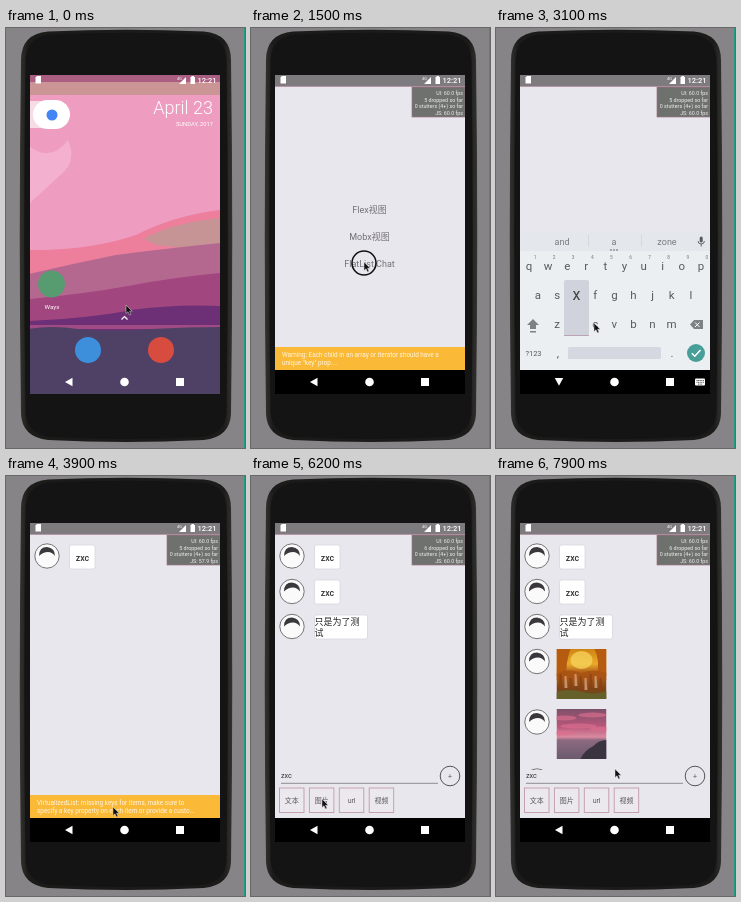
These frames come from a looping animation (239x420 px, 8000 ms). An HTML page:

```html
<!DOCTYPE html>
<html lang="en">
<head>
<meta charset="utf-8">
<title>Phone chat demo</title>
<style>
html, body { margin: 0; width: 100%; height: 100%; overflow: hidden; background: #868486; }
svg { display: block; width: 100%; height: 100%; }
text { font-family: Roboto, "Noto Sans CJK SC", "Noto Sans CJK", sans-serif; }
.mid { text-anchor: middle; }
.end { text-anchor: end; }
.item { font-size: 9px; fill: #737078; }
.key { font-size: 11.5px; fill: #565b60; text-anchor: middle; }
.warn { font-size: 6.4px; fill: #fff5df; }
.perf { font-size: 5.3px; fill: #eee; text-anchor: end; }
</style>
</head>
<body>
<svg id="stage" viewBox="0 0 239 420">
  <defs>
    <linearGradient id="edge">
      <stop offset="0" stop-color="#33322f"/><stop offset=".04" stop-color="#1b1b1a"/>
      <stop offset=".96" stop-color="#1b1b1a"/><stop offset="1" stop-color="#33322f"/>
    </linearGradient>
    <linearGradient id="autumn" x2="0" y2="1">
      <stop offset="0" stop-color="#cf8313"/><stop offset=".3" stop-color="#e9ab2a"/>
      <stop offset=".45" stop-color="#b7671a"/><stop offset=".8" stop-color="#7d4316"/>
      <stop offset="1" stop-color="#5c5a22"/>
    </linearGradient>
    <linearGradient id="dusk" x2="0" y2="1">
      <stop offset="0" stop-color="#7d5069"/><stop offset=".35" stop-color="#b9577a"/>
      <stop offset=".56" stop-color="#d98aa0"/><stop offset=".62" stop-color="#8d6a80"/>
      <stop offset="1" stop-color="#6b5a6d"/>
    </linearGradient>
    <clipPath id="screen"><rect x="24" y="47" width="190" height="319"/></clipPath>
    <clipPath id="content"><rect x="23" y="58" width="192" height="284"/></clipPath>
    <clipPath id="listBox"><rect id="listClip" x="23" y="58" width="192" height="262"/></clipPath>
    <g id="avatar">
      <circle r="12.2" fill="#fbfafb" stroke="#555" stroke-width=".8"/>
      <path d="M-8 0Q-8-9 0-9Q8-8 8 0Q5-4 1-4Q-4-4-8 0Z" fill="#3a383c"/>
    </g>
  </defs>

  <rect width="239" height="420" fill="#868486"/>
  <rect x="238" width="1" height="420" fill="#229b83"/>

  <!-- phone -->
  <path d="M15 32Q15 6 42 3.5Q120 0 198 3.5Q225 6 225 32Q227.5 210 225 386Q224 409 198 412Q120 416 42 412Q16 409 15 386Q12.5 210 15 32Z" fill="url(#edge)"/>
  <path d="M19.5 34Q19.5 9 44 6.5Q120 3 196 6.5Q220.500 9 220.500 34Q223 210 220.500 384Q219.500 406 196 409Q120 413 44 409Q20.500 406 19.500 384Q17 210 19.500 34Z" fill="#141414"/>

  <g clip-path="url(#screen)">
    <!-- home -->
    <g>
      <rect x="23" y="46" width="192" height="320" fill="#ee9cc0"/>
      <path d="M23 118Q45 135 62 112Q72 135 52 149Q38 162 23 176Z" fill="#f3b1cf"/>
      <path d="M23 222Q82 223 130 207Q170 187 215 182V280H23Z" fill="#ed7f9c"/>
      <path d="M138 211Q165 195 215 190V221Q180 221 150 217Z" fill="#c79496"/>
      <path d="M23 246Q65 236 110 227Q165 220 215 215V290H23Z" fill="#b5688f"/>
      <path d="M23 271Q78 266 122 258Q170 249 215 245V310H23Z" fill="#a2467f"/>
      <path d="M23 293Q85 290 125 282Q170 276 215 278V320H23Z" fill="#6d2f76"/>
      <path d="M23 297H215V301H23Z" fill="#a04a86"/>
      <path d="M23 301Q45 297 72 301Q110 304 145 301Q185 299 215 299V366H23Z" fill="#4e4165"/>
      <rect x="23" y="46" width="192" height="8" fill="#aa5f82"/>
      <rect x="23" y="54" width="192" height="13" fill="#cb9595"/>
      <rect x="23" y="73" width="18" height="27" fill="#f5dce7"/>
      <rect x="27" y="72" width="37" height="29" rx="14.5" fill="#fff"/>
      <circle cx="46" cy="87" r="5.5" fill="#4285f4"/>
      <text class="end" x="207" y="86" font-size="18" font-weight="300" fill="#fff">April 23</text>
      <text class="end" x="207" y="98" font-size="5.8" fill="#fff">SUNDAY, 2017</text>
      <circle cx="45.5" cy="256" r="13.5" fill="#579c70"/>
      <text class="mid" x="46" y="281" font-size="6.2" fill="#fff">Ways</text>
      <circle cx="82" cy="322" r="13" fill="#3d8edb"/>
      <circle cx="155" cy="322" r="13" fill="#d84c3f"/>
      <path d="M115.5 291.5L118.5 288.5L121.5 291.5" fill="none" stroke="#fff" stroke-width="1.2"/>
    </g>

    <!-- app -->
    <g id="app">
      <rect x="23" y="46" width="192" height="320" fill="#e9e7ee"/>
      <g clip-path="url(#content)">
        <g class="item mid">
          <text x="118.5" y="184.5">Flex视图</text>
          <text x="118.5" y="211.5">Mobx视图</text>
          <text x="118.5" y="238.5">FlatList Chat</text>
        </g>
        <g id="chat">
          <rect x="23" y="58" width="192" height="284" fill="#e9e7ee"/>
          <g clip-path="url(#listBox)"><g id="list"></g></g>
          <g id="entry">
            <text data-on="3600" x="30" y="333.3" font-size="7.2" fill="#333">zxc</text>
            <path d="M30 338.3H187" stroke="#77747a" stroke-width=".8"/>
            <circle cx="199" cy="331" r="9.8" fill="none" stroke="#444" stroke-width=".9"/>
            <text class="mid" x="199" y="333.5" font-size="7" fill="#666">+</text>
          </g>
          <g id="panel"></g>
        </g>
        <g id="board">
          <rect x="23" y="203" width="192" height="139" fill="#eceff1"/>
          <rect x="23" y="203" width="192" height="20" fill="#e4e7eb"/>
          <path d="M92.5 207V219M145.5 207V219" stroke="#cfd3d7" stroke-width=".7"/>
          <g class="mid" font-size="9" fill="#777c81">
            <text x="66" y="217">and</text><text x="118" y="217">a</text><text x="171" y="217">zone</text>
          </g>
          <g fill="#565b60">
            <circle cx="115" cy="222" r=".8"/><circle cx="118" cy="222" r=".8"/><circle cx="121" cy="222" r=".8"/>
            <rect x="203.7" y="208.5" width="3" height="6" rx="1.5"/>
            <path d="M202 213Q202 216 205.2 216Q208.4 216 208.4 213M205.2 216V218.5" fill="none" stroke="#565b60" stroke-width=".9"/>
          </g>
          <g id="keys"></g>
          <path d="M37 291L43 297H40V301H34V297H31ZM34 303H40V304.5H34Z" fill="#7d8286"/>
          <path d="M194 296.5L198 292H207V301H198Z" fill="#7d8286"/>
          <path d="M199 294.5L203.5 299M203.5 294.5L199 299" stroke="#fff"/>
          <text class="mid" x="37.5" y="328" font-size="7.5" fill="#565b60">?123</text>
          <rect x="72" y="319" width="93" height="12" rx="1.5" fill="#d5d8e1"/>
          <circle cx="200" cy="325" r="9" fill="#489e98"/>
          <path d="M195.8 325.2L198.8 328.2L204.5 322" fill="none" stroke="#fff" stroke-width="1.5"/>
          <g id="popup">
            <rect x="-12.5" y="252" width="25" height="56" rx="2" fill="#d0d3dc"/>
            <path d="M-12.5 307.5H12.5" stroke="#b596a6" stroke-width=".8"/>
            <text id="popKey" class="mid" y="272" font-size="16" fill="#3f4347"></text>
          </g>
        </g>
        <g data-on="1000,1800">
          <rect x="23" y="319" width="192" height="23" fill="#fbb938"/>
          <text class="warn" x="31" y="329.3">Warning: Each child in an array or iterator should have a</text>
          <text class="warn" x="31" y="337.3">unique "key" prop....</text>
        </g>
        <g data-on="3800,4400">
          <rect x="23" y="319" width="192" height="23" fill="#fbb938"/>
          <text class="warn" x="31" y="329.3">VirtualizedList: missing keys for items, make sure to</text>
          <text class="warn" x="31" y="337.3">specify a key property on each item or provide a custo...</text>
        </g>
      </g>
      <rect x="23" y="46" width="192" height="12" fill="#7e7b7e"/>
      <path d="M23 58.4H215" stroke="#a3788a" stroke-width=".8"/>
      <rect x="161" y="59" width="53" height="30" fill="#6f716f" stroke="#9b7482" stroke-width=".7"/>
      <text class="perf" x="212" y="67">UI: 60.0 fps</text>
      <text class="perf" x="212" y="73.7" id="drops"></text>
      <text class="perf" x="212" y="80.2">0 stutters (4+) so far</text>
      <text class="perf" x="212" y="86.5" id="fps"></text>
      <rect x="23" y="342" width="192" height="24" fill="#000"/>
    </g>

    <!-- system icons -->
    <g fill="#fff">
      <path d="M29.5 49.5L31 48H35V55.5H29.5Z"/>
      <path d="M180 49V56H173ZM184.5 49H185.5V48H188V49H189V56H184.5Z"/>
      <text x="171" y="52" font-size="4">4G</text>
      <text class="end" x="210.5" y="55" font-size="7.5" font-weight="500">12:21</text>
      <path id="back" d="M59 354L66.5 349.8V358.2Z"/>
      <circle cx="118.5" cy="354" r="4.3"/>
      <rect x="170" y="350" width="8" height="8"/>
      <g id="imeIcon">
        <rect x="199" y="350.5" width="10" height="7" rx="1"/>
        <path d="M200.5 352.5H208M200.5 354.3H208M202 356.1H206.5" stroke="#222" stroke-width=".8" stroke-dasharray="1 .6"/>
      </g>
    </g>
  </g>

  <circle id="ring" r="12" fill="none" stroke="#111" stroke-width="1.6"/>
  <path id="cursor" d="M0 0V8.5L2 6.8L3.5 10L5 9.3L3.6 6.2H6.2Z" fill="#111" stroke="#ddd" stroke-width=".5"/>
</svg>
<script>
const LOOP = 8000, STEP = 100;
const $ = id => document.getElementById(id);
const show = (el, on) => el.setAttribute("display", on ? "inline" : "none");
const move = (el, x, y) => el.setAttribute("transform", `translate(${x} ${y})`);
const ramp = (t, from, to) => Math.max(0, Math.min(1, (t - from) / (to - from)));
const ease = k => 1 - (1 - k) ** 2;

// [time, x, y] of the pointer tip
const path = [
  [0, 120, 277], [300, 119, 287], [600, 110, 250], [1100, 118, 246], [1400, 113, 234],
  [1700, 113, 234], [2200, 100, 331], [2500, 96, 326], [2700, 62, 295], [2900, 79, 295],
  [3000, 81, 295], [3100, 98, 295], [3300, 98, 295], [3500, 199, 323], [3600, 199, 323],
  [3900, 107, 331], [4300, 107, 331], [4700, 190, 325], [5100, 196, 320], [5400, 196, 322],
  [5700, 42, 324], [5900, 42, 324], [6200, 71, 323], [6400, 71, 323], [6700, 164, 323],
  [7000, 101, 323], [7200, 101, 323], [7400, 130, 323], [7600, 130, 323], [7900, 119, 293], [8000, 119, 290]
];
const clicks = [300, 1400, 1500, 2200, 4300, 5300, 5800, 6300, 7100, 7500];
const presses = [[2700, "z", 61], [3000, "x", 80.5], [3300, "c", 99]];
const jsRate = [[0, 60], [3700, 57.9], [4300, 60], [4700, 51.7], [5500, 60], [6400, 45.6], [7200, 60]];

const card = (y, w) =>
  `<rect x="63.500" y="${y - 12}" width="${w}" height="24" rx="2" fill="#fff" stroke="#d5d1d9" stroke-width=".7"/>`;
const shortText = (y, s) =>
  `${card(y, 25.5)}<text class="mid" x="76.500" y="${y + 4}" font-size="8.800" font-weight="500" fill="#333">${s}</text>`;
const longText = (y, lines) => card(y, 53) + lines.map((s, i) =>
  `<text x="63.500" y="${y - 2 + i * 10.5}" font-size="9" fill="#222">${s}</text>`).join("");
const picture = (y, fill, inner) =>
  `<svg x="60.500" y="${y}" width="50" height="50"><rect width="50" height="50" fill="url(#${fill})"/>${inner}</svg>`;

const falls = Array.from({ length: 9 }, (_, i) =>
  `<path d="M${3 + i * 5} ${25 + i % 3 * 2}h2l1 ${15 - i % 2 * 3}h-3Z" fill="${i % 2 ? "#d9a27c" : "#8e3f12"}" opacity=".8"/>`).join("");
const autumn = `<path d="M0 0H14Q9 14 10 27H0ZM50 0H38Q44 12 40 27H50Z" fill="#b65c10"/>
  <ellipse cx="25" cy="11" rx="11" ry="9" fill="#f7d45c" opacity=".75"/>
  <path d="M0 25Q12 18 25 24Q38 19 50 24V31H0Z" fill="#a85213" opacity=".8"/>${falls}
  <path d="M0 43Q14 39 26 43T50 42V50H0Z" fill="#66602a"/>`;
const clouds = [[8, 9, 12], [36, 6, 14], [22, 17, 18], [44, 20, 11], [7, 24, 12]].map(([x, y, r]) =>
  `<ellipse cx="${x}" cy="${y}" rx="${r}" ry="2.5" fill="#dc6f8f" opacity=".65"/>`).join("");
const dusk = `${clouds}<path d="M50 31Q42 31 37 37Q28 41 24 50H50Z" fill="#39343f"/>`;

// [time, avatar centre, body]
const messages = [
  [3700, 80, shortText(81, "zxc")],
  [4700, 115.5, shortText(116, "zxc")],
  [5800, 150.5, longText(151, ["只是为了测", "试"])],
  [6400, 185.5, picture(173, "autumn", autumn)],
  [7100, 246, picture(233, "dusk", dusk)],
  [7600, 305, ""]
];
$("list").innerHTML = messages.map(([at, y, body]) =>
  `<g data-on="${at}"><use href="#avatar" x="41" y="${y}"/>${body}</g>`).join("");

$("panel").innerHTML = ["文本", "图片", "url", "视频"].map((s, i) =>
  `<rect x="${28.5 + i * 29.9}" y="312" width="24.5" height="24.5" fill="#ebe8ee" stroke="#c29aaa" stroke-width=".9"/>
   <text class="mid" x="${40.8 + i * 29.9}" y="327" font-size="7" fill="#5a575d">${s}</text>`).join("");

$("keys").innerHTML = [["qwertyuiop", 33, 242], ["asdfghjkl", 42, 271], ["zxcvbnm", 61, 300]].map(([row, x, y], r) =>
  [...row].map((c, i) => `<text class="key" x="${x + i * 19.1}" y="${y}">${c}</text>` +
    (r ? "" : `<text class="mid" x="${x + 6 + i * 19.1}" y="231" font-size="4.8" fill="#777">${(i + 1) % 10}</text>`)).join("")).join("") +
  `<text class="key" x="62" y="329">,</text><text class="key" x="176" y="329">.</text>`;

const timed = [...document.querySelectorAll("[data-on]")].map(el => {
  const [from, to = LOOP] = el.dataset.on.split(",").map(Number);
  return { el, from, to };
});

function pointer(t) {
  const i = Math.max(1, path.findIndex(p => p[0] > t));
  const [a, x, y] = path[i - 1], [b, u, v] = path[i];
  const k = (t - a) / (b - a);
  return [x + (u - x) * k, y + (v - y) * k];
}

function render(t) {
  for (const { el, from, to } of timed) show(el, t >= from && t < to);

  const open = ease(ramp(t, 500, 800));
  $("app").setAttribute("opacity", open);
  move($("app"), 0, 30 * (1 - open));

  const page = ease(ramp(t, 1600, 1900));
  $("chat").setAttribute("opacity", page);
  move($("chat"), 0, 40 * (1 - page));

  const typing = t >= 2300 && t < 3700;
  show($("board"), typing);
  move($("board"), 0, 139 * (1 - ease(ramp(t, 2200, 2500)) + ramp(t, 3500, 3800)));
  show($("imeIcon"), typing);
  $("back").setAttribute("d", typing ? "M58.8 350H67.2L63 357.8Z" : "M59 354L66.5 349.8V358.2Z");

  const press = presses.find(([at]) => t >= at && t < at + 200);
  show($("popup"), press);
  if (press) {
    $("popKey").textContent = press[1];
    move($("popup"), press[2], 0);
  }

  const panel = t >= 5400;
  show($("panel"), panel);
  move($("entry"), 0, panel ? -31 : 0);
  $("listClip").setAttribute("height", panel ? 236 : 262);

  $("drops").textContent = `${t < 5800 ? 5 : 6} dropped so far`;
  $("fps").textContent = `JS: ${jsRate.filter(r => r[0] <= t).pop()[1].toFixed(1)} fps`;

  const [x, y] = pointer(t);
  move($("cursor"), x, y);
  move($("ring"), x, y + 1);
  show($("ring"), clicks.includes(t));
}

const start = performance.now();
let last = -1;
function tick() {
  const t = Math.floor(((performance.now() - start) % LOOP) / STEP) * STEP;
  if (t !== last) render(last = t);
  requestAnimationFrame(tick);
}
tick();
</script>
</body>
</html>
```
